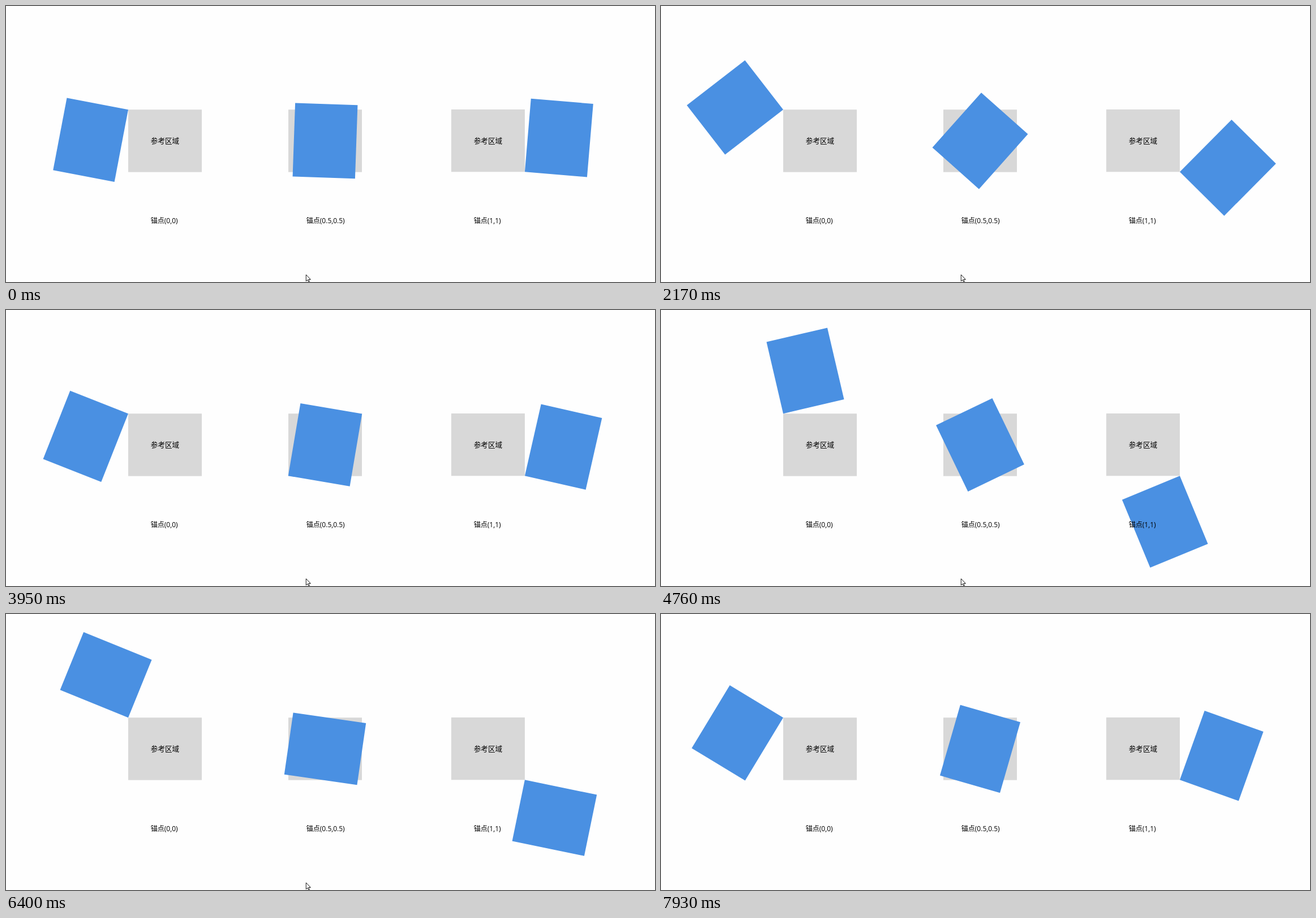
Animation of 1147x488 px, one loop 8.03 s. Source, as an HTML page:

```html
<!DOCTYPE html>
<html lang="zh-CN">
<head>
<meta charset="utf-8">
<style>
  html, body { margin: 0; width: 100%; height: 100%; overflow: hidden; background: #fefefe; }
  svg { display: block; width: 1147px; height: 488px; }
  text { font: 12px "Open Sans", "Noto Sans CJK SC", "Noto Sans CJK", sans-serif; fill: #000; }
  .title { font-size: 12.6px; text-anchor: middle; }
  .area { fill: #d8d8d8; }
  .box { fill: #4a90e2; }
</style>
</head>
<body>
<svg viewBox="0 0 1147 488">
  <g id="panels"></g>
  <path id="cursor" d="M0 0V11.6L2.7 9.2L4.6 13.4L6.2 12.7L4.4 8.5H8Z" fill="#fff" stroke="#000" stroke-width=".9"/>
</svg>
<script>
const LOOP = 8030, W = 130, H = 110.4;

// anchor: pivot as a share of the box; start: degrees at time 0; speed: degrees per ms
const panels = [
  { x: 216, y: 183.2, anchor: 0, labelX: 255.8, start: 100.8, speed: 0.185 },
  { x: 499, y: 183.2, anchor: 0.5, labelX: 530.8, start: 92, speed: 0.1842 },
  { x: 786.9, y: 182.9, anchor: 1, labelX: 826.8, start: 94.8, speed: 0.1843 }
];

document.getElementById('panels').innerHTML = panels.map(({ x, y, anchor, labelX }) => {
  const rect = kind => `<rect class="${kind}" x="${x}" y="${y}" width="${W}" height="${H}"/>`;
  return `${rect('area')}
    <text class="title" x="${x + W / 2}" y="${y + 59.8}">参考区域</text>
    ${rect('box')}
    <text x="${labelX}" y="384.3">锚点(${anchor},${anchor})</text>`;
}).join('');

const boxes = document.querySelectorAll('.box');
const cursor = document.getElementById('cursor');

// The picture advances in held steps at a slightly uneven pace: [time, step number]
const pace = [[0, 0], [1050, 8], [2170, 16], [3200, 24], [3950, 29], [5390, 40], [6670, 49], [LOOP, 59]];

function hold(t) {
  const i = pace.findIndex(p => p[0] > t);
  const [from, first] = pace[i - 1], [to, last] = pace[i];
  const step = (to - from) / (last - first);
  return from + Math.floor((t - from) / step) * step;
}

function draw() {
  const t = hold(performance.now() % LOOP);
  panels.forEach(({ x, y, anchor, start, speed }, i) => {
    const angle = start + speed * t;
    boxes[i].setAttribute('transform', `rotate(${angle} ${x + W * anchor} ${y + H * anchor})`);
  });
  const drop = Math.max(0, t - 6400) / 20;
  cursor.setAttribute('transform', `translate(530.3 ${475 + drop})`);
  requestAnimationFrame(draw);
}
draw();
</script>
</body>
</html>
```
